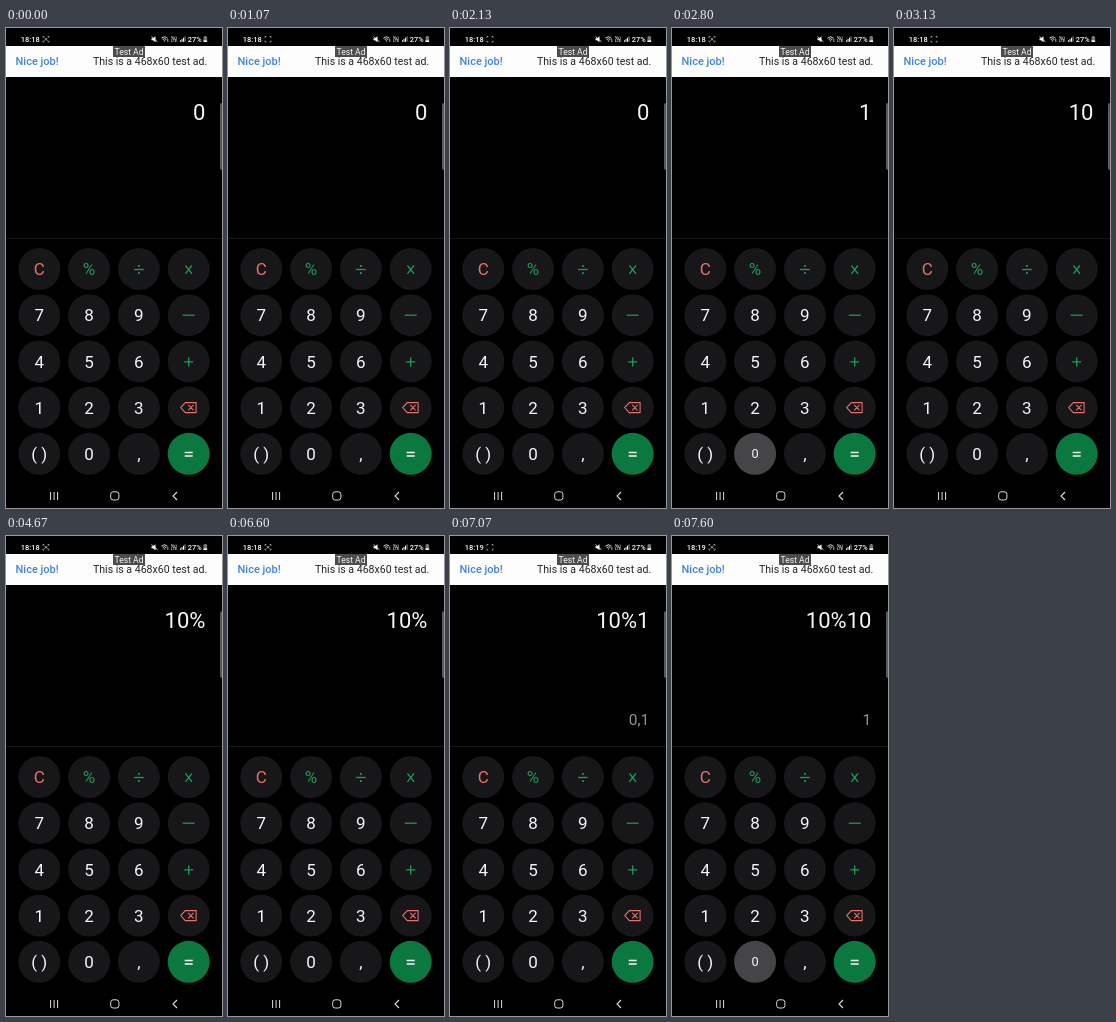
Write an HTML page with a canvas that moves like this. It is 216 by 480 pixels and loops after 8 s.

```html
<!DOCTYPE html>
<html lang="en">
<head>
<meta charset="utf-8">
<title>Calculator</title>
<style>
html, body { margin: 0; height: 100%; overflow: hidden; background: #000; }
canvas { display: block; }
</style>
</head>
<body>
<canvas id="stage" width="216" height="480"></canvas>
<script>
const ctx = document.getElementById('stage').getContext('2d');
const LOOP = 8000;
const WHITE = '#f7f7f7', GREEN = '#1c9f5b', RED = '#e8716c';

const KEYS = ['C', '%', '÷', 'x', '7', '8', '9', '−', '4', '5', '6', '+',
  '1', '2', '3', '⌫', '( )', '0', ',', '='];

// [start, value] steps and [start, end, key] presses, in ms
const DISPLAY = [[0, '0'], [2800, '1'], [3070, '10'], [4600, '10%'], [7070, '10%1'], [7600, '10%10']];
const RESULT = [[0, ''], [7070, '0,1'], [7600, '1']];
const CLOCK = [[0, '18:18'], [6870, '18:19']];
const PRESSES = [[2400, 2800, '1'], [2800, 3070, '0'], [4330, 4600, '%'], [6670, 7070, '1'], [7130, LOOP, '0']];

const valueAt = (steps, t) => steps.filter(([start]) => start <= t).pop()[1];
const isPressed = (key, t) => PRESSES.some(([from, to, k]) => k === key && t >= from && t < to);

function text(str, x, y, size, color = WHITE, align = 'left', weight = 400) {
  ctx.font = `${weight} ${size}px Roboto, sans-serif`;
  ctx.textAlign = align;
  ctx.fillStyle = color;
  ctx.fillText(str, x, y);
}

function rect(x, y, w, h, color) {
  ctx.fillStyle = color;
  ctx.fillRect(x, y, w, h);
}

function stroke(path, color, width = 1) {
  ctx.strokeStyle = color;
  ctx.lineWidth = width;
  ctx.stroke(new Path2D(path));
}

function fill(path, color) {
  ctx.fillStyle = color;
  ctx.fill(new Path2D(path));
}

function drawStatusBar(t) {
  text(valueAt(CLOCK, t), 14.8, 13.6, 7.5, WHITE, 'left', 500);
  const focusOn = (t + 430) % 500 !== 0 && (t < 70 || (t - 70) % 1000 >= 530);
  stroke('M37 9.8V8.5H38.3 M41.7 8.5H43V9.8 M37 12.7V14H38.3 M41.7 14H43V12.7', '#bbb', .8);
  if (focusOn) {
    stroke('M38.5 9.8L41.5 12.8 M41.5 9.8L38.5 12.8', '#ccc', .8);
  }
  fill('M145.5 10.2H147L149.5 8.2V14.2L147 12.3H145.5Z', WHITE);
  stroke('M145.5 8.5L151.5 13.8', WHITE, .8);
  stroke('M155.5 10.2Q158.5 7.2 161.5 10.2 M156.7 11.6Q158.5 9.8 160.3 11.6', WHITE, .9);
  fill('M157.5 12.4H159.5L158.5 13.8Z', WHITE);
  stroke('M161.8 11V14', WHITE, .7);
  text('Vo)', 165, 10.8, 3.8, WHITE, 'left', 500);
  text('LTE', 165, 14.2, 3.8, WHITE, 'left', 500);
  [1.5, 2.8, 4.1, 5.4].forEach((h, i) => rect(174 + i * 1.5, 13.8 - h, 1, h, i < 3 ? WHITE : '#999'));
  text('27%', 181.8, 13.6, 7.4, WHITE, 'left', 500);
  rect(197.5, 8.6, 3.6, 5.4, '#777');
  rect(198.5, 8, 1.6, .8, '#999');
  rect(197.5, 12.4, 3.6, 1.6, WHITE);
}

function drawBanner() {
  rect(0, 18, 216, 31, '#fdfdfe');
  text('Nice job!', 9.5, 37.3, 11, '#3f83ec', 'left', 500);
  text('This is a 468x60 test ad.', 87, 37.3, 10.55, '#242428');
  rect(107, 18, 32, 11, '#4c4c4e');
  text('Test Ad', 123, 27, 8.6, WHITE, 'center');
}

function drawKey(key, i, t) {
  const x = 33.3 + (i % 4) * 49.8, y = 241 + Math.floor(i / 4) * 46.2;
  const down = isPressed(key, t);
  ctx.beginPath();
  ctx.arc(x, y, 21, 0, 7);
  ctx.fillStyle = key === '=' ? '#0b793f' : down ? '#454547' : '#171618';
  ctx.fill();

  ctx.save();
  ctx.translate(x, y);
  if (down) ctx.scale(.75, .75);
  if (key === '−') stroke('M-6 0H6', GREEN, 1.2);
  else if (key === '+') stroke('M-4.5 .5H4.5 M0 -4V5', GREEN, 1.3);
  else if (key === '÷') {
    stroke('M-4.8 .5H4.8', GREEN, 1.3);
    rect(-.9, -4, 1.8, 1.8, GREEN);
    rect(-.9, 3.2, 1.8, 1.8, GREEN);
  } else if (key === 'x') stroke('M-3.3 -3.6L3.3 4.8 M3.3 -3.6L-3.3 4.8', GREEN, 1.3);
  else if (key === '=') stroke('M-4 -1.3H4 M-4 2.2H4', WHITE, 1.3);
  else if (key === '⌫') {
    stroke('M-3.4 -5H7.4V5H-3.4L-8 0Z M-.5 -2.7L4.9 2.7 M4.9 -2.7L-.5 2.7', RED, 1.1);
  } else {
    text(key, 0, 6.2, 17, key === 'C' ? RED : key === '%' ? GREEN : WHITE, 'center');
  }
  ctx.restore();
}

function drawNavigation() {
  stroke('M44.6 464V472 M48.1 464V472 M51.6 464V472', '#ddd', 1);
  ctx.beginPath();
  ctx.roundRect(104.7, 463.8, 8.2, 8.2, 2.5);
  ctx.strokeStyle = '#ddd';
  ctx.stroke();
  stroke('M171 464L167 468L171 472', '#ddd', 1.1);
}

function draw(now) {
  const t = now % LOOP;
  rect(0, 0, 216, 480, '#000');
  drawStatusBar(t);
  drawBanner();
  text(valueAt(DISPLAY, t), 199.4, 91.7, 22, WHITE, 'right');
  text(valueAt(RESULT, t), 199.2, 188.7, 15.5, '#929294', 'right');
  rect(0, 210, 216, 1, '#171717');
  ctx.beginPath();
  ctx.roundRect(214, 75, 4, 67, 2);
  ctx.fillStyle = '#59595b';
  ctx.fill();
  KEYS.forEach((key, i) => drawKey(key, i, t));
  drawNavigation();
}

const start = performance.now();
function tick() {
  draw(performance.now() - start);
  requestAnimationFrame(tick);
}
tick();
</script>
</body>
</html>
```
